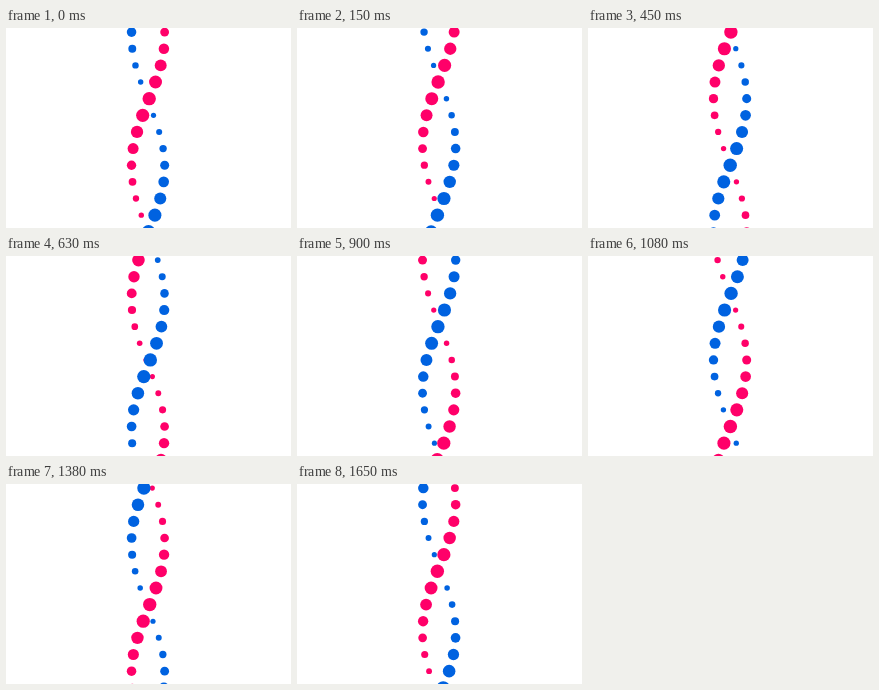
These frames come from a looping animation (285 px wide and 200 px high, 1680 ms). An HTML page with a canvas:

```html
<!DOCTYPE html>
<html lang="en">
<head>
<meta charset="utf-8">
<title>Double helix</title>
<style>
  html, body { margin: 0; width: 100%; height: 100%; overflow: hidden; background: #fff; }
  canvas { display: block; width: 100%; height: 100%; }
</style>
</head>
<body>
<canvas width="285" height="200"></canvas>
<script>
const ctx = document.querySelector('canvas').getContext('2d');
const LOOP = 1680, STEP = 30, ROWS = 13;
const PINK = '#ff0069', BLUE = '#0062e0';
const rad = degrees => degrees * Math.PI / 180;

function drawBead(row, angle, color) {
  const x = 142.1 + 16.6 * Math.cos(angle);
  const y = 4.1 + 16.64 * row;
  const radius = 4.6 + 2.1 * Math.sin(angle);
  ctx.fillStyle = color;
  ctx.beginPath();
  ctx.arc(x, y, radius, 0, 2 * Math.PI);
  ctx.fill();
}

function draw(time) {
  const step = Math.floor((time % LOOP) / STEP);
  // The turn starts slightly slower, then runs at a constant speed.
  const turn = 6.37 * step - 8.3 + 3.3 * Math.max(0, 1 - step / 9);
  ctx.fillStyle = '#fff';
  ctx.fillRect(0, 0, 285, 200);
  for (let row = 0; row < ROWS; row++) {
    const angle = rad(turn + 22.8 * row);
    const beads = [[angle, PINK], [angle + Math.PI, BLUE]];
    // The nearer bead is painted last.
    beads.sort((a, b) => Math.sin(a[0]) - Math.sin(b[0]));
    for (const [beadAngle, color] of beads) drawBead(row, beadAngle, color);
  }
}

const start = performance.now();
function tick() {
  draw(performance.now() - start);
  requestAnimationFrame(tick);
}
tick();
</script>
</body>
</html>
```
